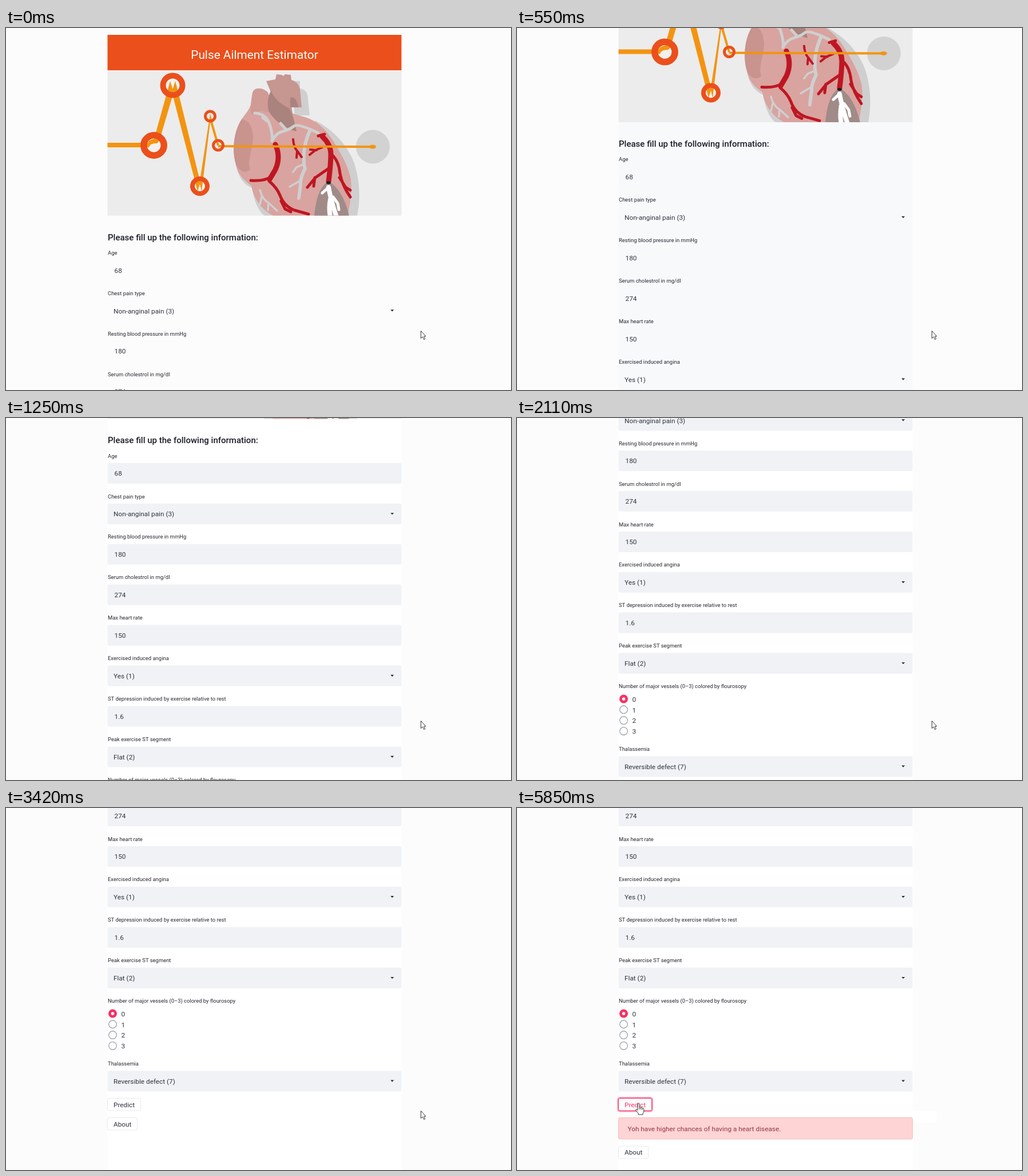
An HTML page for the animation above (6720 ms loop, 883 px wide and 634 px high).

```html
<!DOCTYPE html>
<html lang="en">
<head>
<meta charset="utf-8">
<title>Pulse Ailment Estimator</title>
<style>
  html, body { margin: 0; width: 100%; height: 100%; overflow: hidden; background: #fcfcfc; }
  svg { display: block; width: 100%; height: 100%; }
  text { font: 11.8px Roboto, "Open Sans", sans-serif; fill: #31333f; }
  .title { font-size: 20.8px; fill: #fff; text-anchor: middle; }
  .heading { font-size: 15px; font-weight: 500; fill: #1c1e29; }
  .label { font-size: 9.45px; fill: #262730; }
  .alert { fill: #953440; }
  .line { fill: none; stroke-linejoin: round; stroke-linecap: round; }
  .button { fill: #fff; stroke: #e6eaf1; }
  .hover .button { stroke: #f63366; }
  .hover text { fill: #f63366; }
  .pressed .button { fill: #f63366; }
  .pressed text { fill: #fff; }
</style>
</head>
<body>
<svg viewBox="0 0 883 634">
  <defs><clipPath id="heroClip"><path d="M177.5 74H691.5V328.6H177.5z"/></clipPath></defs>
  <rect id="column" x="177.5" width="514.5" height="634"/>
  <rect id="patch" x="692" y="530" width="42" height="21" rx="3" fill="#fff"/>
  <g id="page">
    <path fill="#eb4f1b" d="M177.5 12H691.5V74H177.5z"/>
    <text class="title" x="434.5" y="54">Pulse Ailment Estimator</text>
    <g clip-path="url(#heroClip)">
      <path fill="#ececec" d="M177 74H692V329H177z"/>
      <circle cx="641.5" cy="208" r="29.5" fill="#d2d2d2"/>
      <!-- shadow -->
      <path fill="#cfcfcf" d="M498 93H514V106Q528 108 528 125L531 153H505zM540 162C572 177 600 208 610 240C620 275 619 305 614 329H580zM402 238C405 262 418 276 430 280C434 304 441 320 452 329H480L440 270z"/>
      <!-- heart body -->
      <path fill="#d9a39f" d="M429 130C427 142 420 148 412 160C397 185 395 215 402 240C406 257 416 267 429 276C433 299 447 319 468 329H597C602 309 605 286 603 265C598 239 583 216 571 196C557 174 540 160 519 155L470 140Q450 118 429 130z"/>
      <path fill="#d09a95" d="M431 113Q434 104 446 106Q458 109 460 118L461 148L447 145Q440 146 429 152Q426 140 431 113z"/>
      <path fill="#c9938e" d="M412 160C395 185 396 225 403 240C407 250 418 256 427 248C421 230 433 210 432 188C430 174 426 161 412 160z"/>
      <!-- aorta -->
      <path fill="#c69690" d="M455 93L471 90L473 81L482 82L485 84L488 81L498 82L499 91Q511 94 514 107L517 139H496V120L503 160L508 181Q478 174 460 146Q454 128 463 112z"/>
      <path fill="#aa837e" d="M463 110Q472 130 496 141L503 160L508 181Q478 174 460 147Q454 130 463 110zM497 139V122Q508 119 511 139z"/>
      <g class="line" stroke="#cfcfcf" stroke-width="5">
        <path d="M435 149Q455 150 461 169T465 196M458 164L449 157M465 198Q472 184 484 181T503 172T546 184M490 178L480 167"/>
        <path d="M532 178Q522 200 521 219T523 246Q514 263 515 274L512 298" stroke-width="6"/>
        <path d="M522 238L508 244L502 252M515 267L496 278M444 284Q448 300 460 307L474 320M447 296L444 309M459 307L458 319" stroke-width="3.5"/>
      </g>
      <g class="line" stroke="#be1622">
        <path d="M471 204Q481 226 471 248L461 265" stroke-width="9"/>
        <path d="M464 260Q452 269 428 267M460 268Q474 280 479 293Q486 312 504 319L529 326M481 303L488 317L498 322" stroke-width="5"/>
        <path d="M553 190Q568 204 568 221T564 269" stroke-width="9"/>
        <path d="M546 189L557 186M570 222Q582 233 584 255Q588 276 602 296M583 262L594 279L602 284M564 246L541 262L527 279M540 262L538 277" stroke-width="5"/>
        <path d="M502 195Q503 209 509 215L517 226M509 216L508 227M553 209L541 214L531 222M543 214L532 213" stroke-width="4"/>
      </g>
      <path fill="#a08b88" d="M539 329C542 298 549 276 564 269C582 278 594 303 600 329z"/>
      <g class="line" stroke="#fff">
        <path d="M564 279Q568 302 578 331M567 300Q564 315 567 331" stroke-width="8"/>
        <path d="M564 279L553 289M572 296L580 307L582 318" stroke-width="5"/>
      </g>
      <ellipse cx="564" cy="271" rx="4" ry="2.5" fill="#221a1c"/>
      <!-- pulse line -->
      <g id="pulse">
        <g fill="#f3f1ee"><circle cx="258.5" cy="205.5" r="14"/><circle cx="291.5" cy="100.5" r="14"/><circle cx="339" cy="277" r="11"/></g>
        <path fill="#f39410" d="M177 201H248Q250 196 259 194L287 93L291.5 107L296 93L301 112L339 267L357 150L373 206H369L357 165L342 286L339 273L335 286L291.5 118L268 198L264 202Q253 201 250 209H177z"/>
        <path stroke="#f39410" stroke-width="4" d="M371 207L640 208"/>
        <ellipse cx="641" cy="208" rx="6" ry="3.5" fill="#f39410"/>
      </g>
    </g>
    <text class="heading" x="178" y="371.5">Please fill up the following information:</text>
    <g id="form"></g>
    <g id="predict">
      <rect id="ring" x="176.4" y="1130.2" width="60.4" height="24" rx="4" fill="none" stroke="#fa99b2" stroke-width="2.4"/>
      <rect class="button" x="177.5" y="1131.5" width="58" height="21.5" rx="2.5"/>
      <text x="188" y="1147">Predict</text>
    </g>
    <g id="alert">
      <rect x="177.5" y="1165.3" width="514" height="37.5" rx="2.5" fill="#ffd4d4" stroke="#f5b9bd"/>
      <text class="alert" x="193.5" y="1188.7">Yoh have higher chances of having a heart disease.</text>
    </g>
    <g id="about">
      <rect class="button" x="177.5" y="1165.5" width="52" height="21.5" rx="2.5"/>
      <text x="188" y="1180.5">About</text>
    </g>
  </g>
  <g id="cursor" fill="#fff" stroke="#222" stroke-width=".9" stroke-linejoin="round">
    <path id="arrow" d="M.5 .5V13.5L3.5 10.8L5.7 15.5L7.8 14.5L5.7 10H9z"/>
    <path id="hand" d="M-2 11.5V1.2Q-2 -.5 -.5 -.5T1 1.2V6Q3 5 3.6 6.7Q5.6 5.8 6.2 7.6Q8.8 7 8.8 9.5V13Q8.5 15.5 7 17V19H-1V16.5L-5.2 11.5Q-5.5 9 -3.5 9.5zM1 6V10M3.6 7V10M6.2 8V10.5"/>
  </g>
</svg>
<script>
const LOOP = 6720;
const byId = id => document.getElementById(id);
const show = (id, visible) => byId(id).style.display = visible ? '' : 'none';

const ring = (x, y, radius, width) =>
  `<circle cx="${x}" cy="${y}" r="${radius}" fill="none" stroke="#eb4f1b" stroke-width="${width}"/>`;
byId('pulse').insertAdjacentHTML('beforeend',
  ring(258.5, 205.5, 17.7, 11.5) + ring(291.5, 100.5, 17, 10) + ring(339, 277, 13, 8) +
  ring(357, 154.5, 8.5, 5) + ring(371, 205.5, 8.5, 5));

function field(top, label, value, isSelect) {
  const caret = isSelect ? `<path fill="#262730" d="M672.3 ${top + 16.4}h6l-3 3.2z"/>` : '';
  return `<text class="label" x="178" y="${top - 9.2}">${label}</text>
    <rect class="box" x="177.5" y="${top}" width="514" height="36.2" rx="3" fill="#f0f2f6"/>
    <text x="${isSelect ? 188 : 189.5}" y="${top + 22.6}">${value}</text>${caret}`;
}

function radio(index) {
  const y = 983 + index * 18.8;
  const dot = index
    ? `<circle cx="186.5" cy="${y}" r="6.8" fill="#fff" stroke="#a3a8b4" stroke-width="1.4"/>`
    : `<circle cx="186.5" cy="${y}" r="7.5" fill="#f63366"/><circle cx="186.5" cy="${y}" r="2.7" fill="#fff"/>`;
  return `${dot}<text x="201.5" y="${y + 4.7}">${index}</text>`;
}

const fields = [
  ['Age', '68'],
  ['Chest pain type', 'Non-anginal pain (3)', true],
  ['Resting blood pressure in mmHg', '180'],
  ['Serum cholestrol in mg/dl', '274'],
  ['Max heart rate', '150'],
  ['Exercised induced angina', 'Yes (1)', true],
  ['ST depression induced by exercise relative to rest', '1.6'],
  ['Peak exercise ST segment', 'Flat (2)', true],
];
byId('form').innerHTML =
  fields.map((args, i) => field(406 + i * 70.93, ...args)).join('') +
  '<text class="label" x="178" y="964.4">Number of major vessels (0–3) colored by flourosopy</text>' +
  [0, 1, 2, 3].map(radio).join('') +
  field(1083.2, 'Thalassemia', 'Reversible defect (7)', true);
const boxes = document.querySelectorAll('.box');

// Progress in n equal hard steps: the first at start, the last at end.
const stepped = (t, start, end, n) =>
  t < start ? 0 : Math.min(n, Math.floor((t - start) / (end - start) * (n - 1) + 1e-6) + 1) / n;
const smooth = p => p * p * (3 - 2 * p);

const scrolls = [
  [400, 550, 3, 163.6], [1010, 1250, 4, 163.6], [1940, 2110, 3, 163.8], [3270, 3420, 3, 132],
];

function cursorAt(t) {
  const sweep = stepped(t, 3510, 3900, 6) ** 1.3;
  const approach = 1 - (1 - stepped(t, 3980, 4530, 8)) ** 1.8;
  return [725 - 427 * sweep - 85 * approach, 530 + 23 * sweep - 35 * approach];
}

function draw(t) {
  const scroll = scrolls.reduce((sum, [start, end, n, by]) => sum + by * smooth(stepped(t, start, end, n)), 0);
  byId('page').setAttribute('transform', `translate(0 ${-scroll})`);

  byId('column').setAttribute('fill', t < 400 ? '#fcfcfc' : t < 1010 ? '#f7f9fb' : '#fff');
  boxes.forEach(box => box.style.display = t < 1010 ? 'none' : '');

  const [x, y] = cursorAt(t);
  const hover = x < 236 && y < 530;
  byId('cursor').setAttribute('transform', `translate(${x} ${y})`);
  show('arrow', !hover);
  show('hand', hover);
  show('patch', t >= 3510);

  const pressed = t >= 5080 && t < 5160;
  byId('predict').setAttribute('class', (hover ? 'hover' : '') + (pressed ? ' pressed' : ''));
  show('ring', t >= 5080);
  show('alert', t >= 5850);
  byId('about').setAttribute('transform', `translate(0 ${t >= 5850 ? 49.7 : 0})`);
}

const origin = performance.now();
function tick() {
  draw((performance.now() - origin) % LOOP);
  requestAnimationFrame(tick);
}
tick();
</script>
</body>
</html>
```
